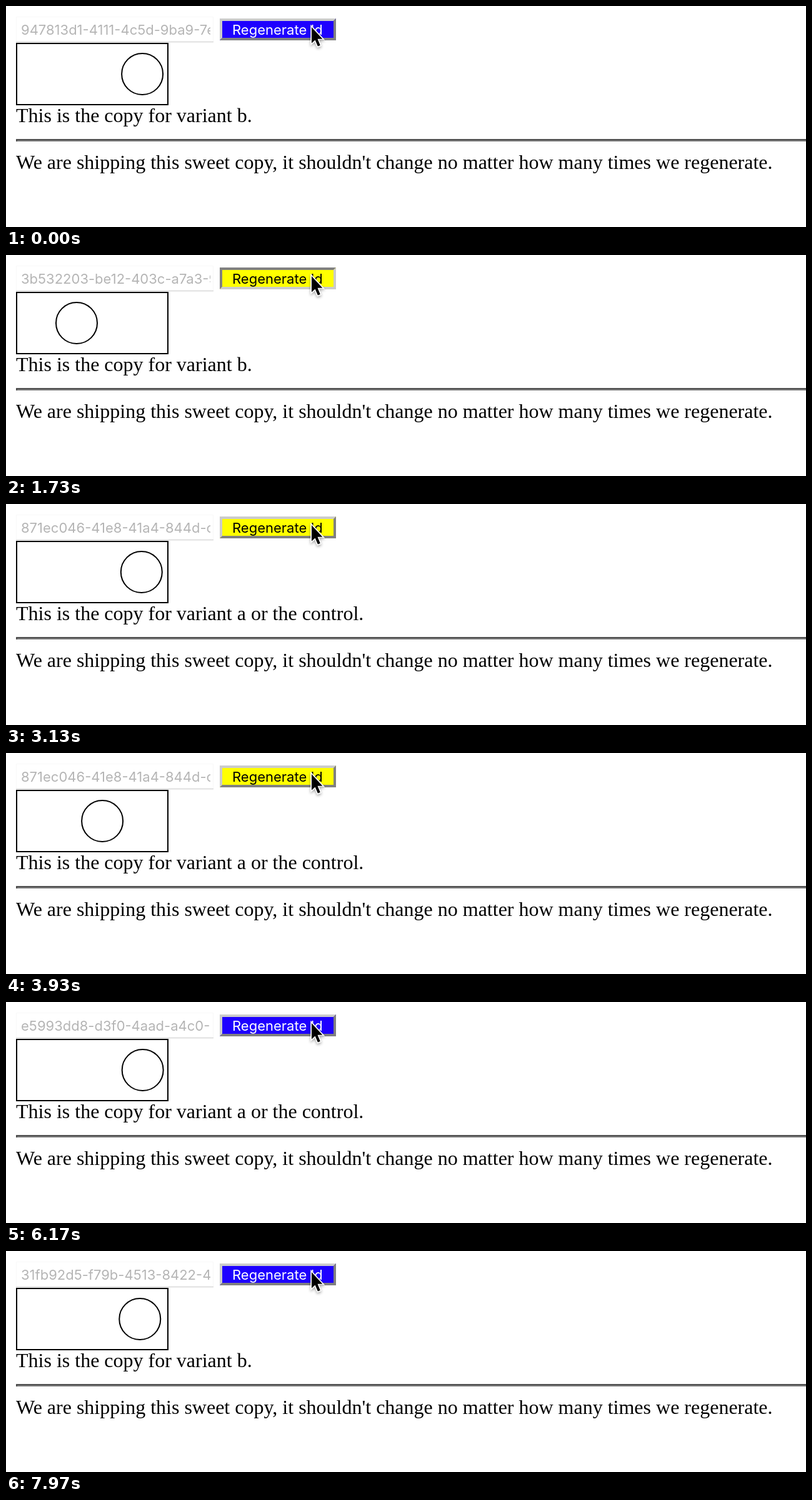
Animation of 1280 by 354 pixels, one loop 8 s. Source, as an HTML page:

```html
<!DOCTYPE html>
<html lang="en">
<head>
<meta charset="utf-8">
<title>Regenerate Id</title>
<style>
  html, body { margin: 0; width: 100%; height: 100%; overflow: hidden; background: #fff; }
  svg { display: block; }
  .ui { font: 22px Inter, sans-serif; }
  .copy { font: 32px "Liberation Serif", Times, serif; }
</style>
</head>
<body>
<svg width="1280" height="354" viewBox="0 0 1280 354">
  <clipPath id="fieldClip"><rect x="20" y="18" width="307" height="40"/></clipPath>
  <path d="M16.5 58V17.5H331.5V58" fill="none" stroke="#f8f8f8"/>
  <path d="M16 57.5H332" stroke="#d8d8d8" stroke-width="1.5"/>
  <text id="field" class="ui" x="24" y="46" fill="#b5b5b5" clip-path="url(#fieldClip)"></text>

  <rect id="face" x="342" y="20" width="186" height="35"/>
  <path id="topLeft" d="M342 55V20H528L524 24H346V51Z"/>
  <path id="bottomRight" d="M342 55H528V20L524 24V51H346Z"/>
  <text id="label" class="ui" x="362" y="46">Regenerate Id</text>

  <g fill="none" stroke="#000" stroke-width="2">
    <rect x="17" y="60" width="242" height="98"/>
    <circle id="ball" cy="109" r="33"/>
  </g>
  <text id="variant" class="copy" x="16" y="186"></text>
  <path d="M16 213H1280V215H18V217H16Z" fill="#505050"/>
  <path d="M18 215H1280V217H18Z" fill="#7c7c7c"/>
  <text class="copy" x="16" y="261">We are shipping this sweet copy, it shouldn't change no matter how many times we regenerate.</text>

  <path d="M489 34V59.5L494.6 54.4L498.9 64.6L502.8 63L498.5 52.8H506.4Z" stroke="#fff" stroke-width="3.4"
    paint-order="stroke" style="filter: drop-shadow(0 2px 2px rgba(0,0,0,.35))"/>
</svg>
<script>
const LOOP = 8000, ORIGIN = 618;
const BLUE = '#1e00ff', YELLOW = '#ffff00';
const FAST = 500, SLOW = 2000;
const A = 'a or the control', B = 'b', C = 'c';

// Mouse down, mouse up, then what the click produced
const clicks = [
  [-200, -100, '947813d1-4111-4c5d-9ba9-7e20', BLUE, B, FAST],
  [130, 230, 'a6d04c7e-95b2-4f18-8c3d-52b1', YELLOW, B, FAST],
  [900, 1010, '3b532203-be12-403c-a7a3-90d4', YELLOW, B, FAST],
  [1690, 1790, '5c9e27b0-6d3a-4b82-b1f5-3a68', YELLOW, B, FAST],
  [2460, 2570, '871ec046-41e8-41a4-844d-c2f9', YELLOW, A, SLOW],
  [4400, 4510, 'f5291f24-26b3-4ce3-9ae1-1b07', YELLOW, C, SLOW],
  [5340, 5450, 'e5993dd8-d3f0-4aad-a4c0-6f13', BLUE, A, SLOW],
  [6960, 7070, '31fb92d5-f79b-4513-8422-4d8a', BLUE, B, FAST],
];

const el = id => document.getElementById(id);
const fill = (id, color) => el(id).setAttribute('fill', color);
const bezier = (s, p1, p2) => 3 * (1 - s) ** 2 * s * p1 + 3 * (1 - s) * s * s * p2 + s ** 3;

// CSS "ease": cubic-bezier(.25, .1, .25, 1)
function ease(x) {
  let low = 0, high = 1;
  for (let i = 0; i < 24; i++) {
    const mid = (low + high) / 2;
    if (bezier(mid, .25, .25) < x) low = mid; else high = mid;
  }
  return bezier(low, .1, 1);
}

function draw(t) {
  const [, , id, color, copy, duration] = clicks.findLast(c => c[1] <= t);
  const pressed = clicks.some(c => c[0] <= t && t < c[1]);
  el('field').textContent = id;
  el('variant').textContent = `This is the copy for variant ${copy}.`;
  fill('face', color);
  fill('label', color === BLUE ? '#fff' : '#000');
  fill('topLeft', pressed ? '#808080' : '#cbcbcb');
  fill('bottomRight', pressed ? '#cbcbcb' : '#808080');

  // Alternating run; a new duration keeps the same start time
  const phase = (t - ORIGIN + 4000) / duration % 2;
  el('ball').setAttribute('cx', 52 + 172 * ease(phase < 1 ? phase : 2 - phase));
}

const start = performance.now();
function tick() {
  draw((performance.now() - start) % LOOP);
  requestAnimationFrame(tick);
}
tick();
</script>
</body>
</html>
```
